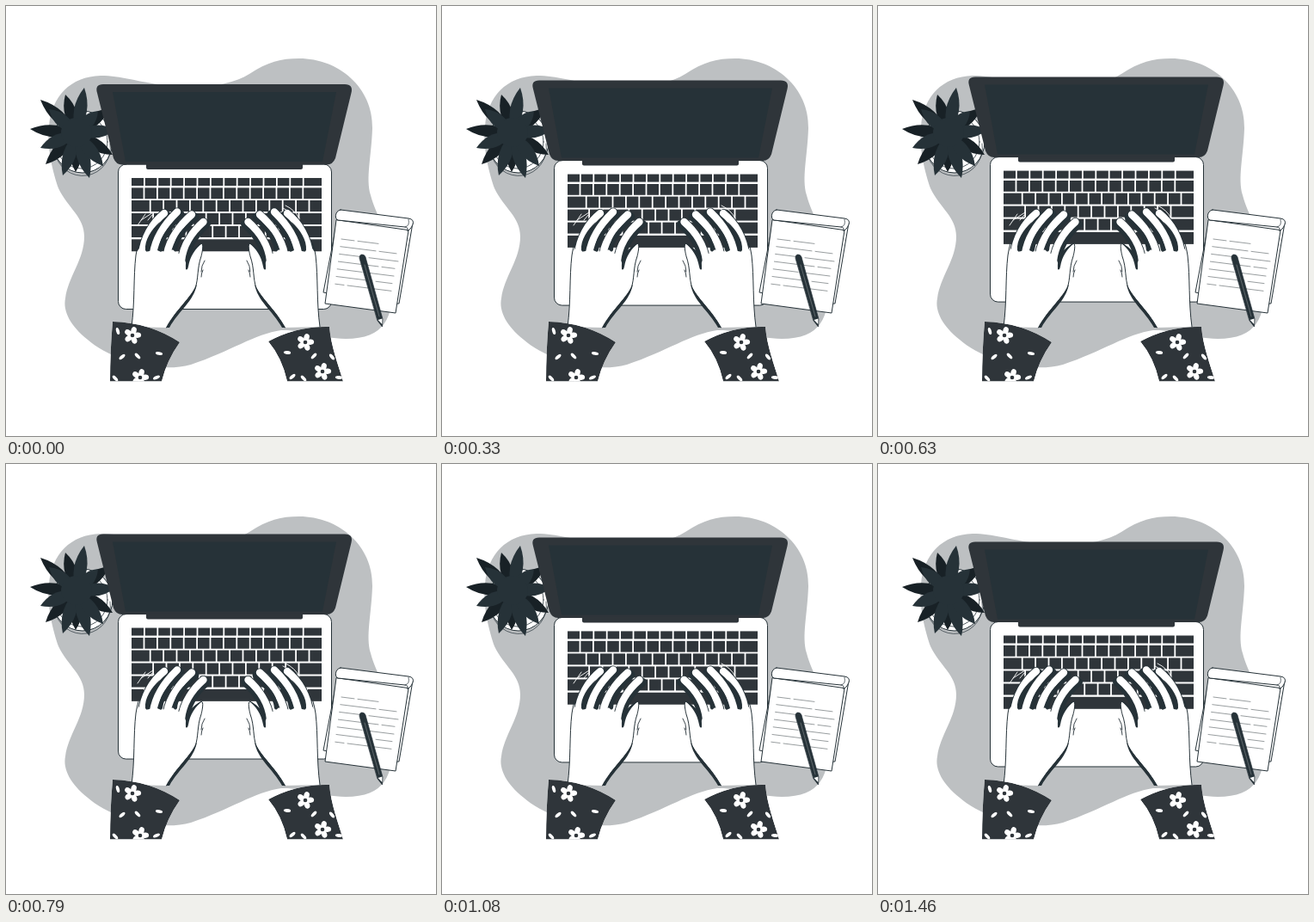
An HTML page with a canvas that plays this animation: 500x500 px, repeating every 1.5 s.

```html
<!DOCTYPE html>
<html lang="en">
<head>
<meta charset="utf-8">
<title>Typing</title>
<style>
html, body { margin: 0; width: 100%; height: 100%; overflow: hidden; background: #fff; }
canvas { display: block; width: 500px; height: 500px; }
</style>
</head>
<body>
<canvas id="stage"></canvas>
<script>
const LOOP = 1500, LIFT = 10;
const INK = '#263238', SOFT = '#2f353a', DEEP = '#182126', GREY = '#bdc0c2', WHITE = '#fff';

const canvas = document.getElementById('stage');
const ctx = canvas.getContext('2d');
const ratio = window.devicePixelRatio || 1;
canvas.width = canvas.height = 500 * ratio;

function fill(d, color) {
  ctx.fillStyle = color;
  ctx.fill(new Path2D(d));
}

function line(d, color = INK, width = 1) {
  ctx.strokeStyle = color;
  ctx.lineWidth = width;
  ctx.stroke(new Path2D(d));
}

function shape(d, color = WHITE, width = 1) {
  fill(d, color);
  line(d, INK, width);
}

function oval(x, y, rx, ry, angle, color) {
  ctx.fillStyle = color;
  ctx.beginPath();
  ctx.ellipse(x, y, rx, ry, angle, 0, 7);
  ctx.fill();
}

function drawBlob() {
  fill(`M110 81C135 81 150 88 185 92C225 98 262 92 283 79C304 65 320 61 341 61
    C387 61 427 95 426 142C425 175 418 200 424 220C430 245 448 262 448 320
    C452 362 440 387 395 387C362 386 345 376 320 377C290 381 260 402 215 417
    C175 428 120 410 95 388C75 372 66 355 69 340C72 315 91 295 91 268
    C91 245 72 235 61 212C55 195 47 165 50 140C53 105 75 82 110 81Z`, GREY);
}

// A pointed leaf from the plant's heart to its tip.
function leaf(tipX, tipY, width, color) {
  const x = 82, y = 148, dx = tipX - x, dy = tipY - y, len = Math.hypot(dx, dy);
  const nx = -dy / len * width, ny = dx / len * width;
  const mx = x + dx * 0.5, my = y + dy * 0.5;
  fill(`M${x} ${y}Q${mx + nx} ${my + ny} ${tipX} ${tipY}Q${mx - nx} ${my - ny} ${x} ${y}Z`, color);
}

function drawPlant() {
  shape('M124 158A35 36 0 1 1 54 158A35 36 0 1 1 124 158Z');
  line('M118 158A30 31 0 1 1 58 158A30 31 0 1 1 118 158Z', INK, 0.8);
  line('M121 160A32 32 0 0 1 57 170', INK, 0.7);
  for (const [x, y] of [[40, 109], [69, 103], [28, 143], [46, 184], [120, 119], [124, 173], [81, 193]]) leaf(x, y, 14, DEEP);
  for (const [x, y] of [[91, 95], [50, 120], [40, 165], [66, 197], [97, 200], [113, 186], [127, 144], [107, 122]]) leaf(x, y, 15, INK);
  oval(82, 147, 18, 17, 0, INK);
}

function keyRow(y, height, first, count) {
  const pitch = 15.4, left = 146, right = 367, gap = 1.8;
  let x = left;
  for (let i = 0; i < count; i++) {
    const end = i === count - 1 ? right + gap : i ? x + pitch : x + first;
    ctx.fillRect(x, y, end - gap - x, height);
    x = end;
  }
}

function drawLaptop() {
  ctx.beginPath();
  ctx.roundRect(130.5, 184, 248, 168.5, 9);
  ctx.fillStyle = WHITE;
  ctx.fill();
  ctx.strokeStyle = INK;
  ctx.lineWidth = 1;
  ctx.stroke();
  fill(`M113 91H394Q404 91 401.500 101L383 177Q380 184.500 373 184.500H135
    Q128 184.500 125 177L106 101Q103 91 113 91Z`, SOFT);
  fill('M124 100H384L368 181H139Z', INK);
  fill('M163 183H345V188Q345 190 343 190H165Q163 190 163 188Z', SOFT);

  ctx.fillStyle = SOFT;
  keyRow(200, 9, 15.8, 14);
  keyRow(211.4, 12.8, 15.4, 14);
  keyRow(226, 13, 22.6, 14);
  keyRow(241, 13, 26, 13);
  keyRow(256, 13, 33.5, 12);
  for (const [x, w] of [[146, 14], [162, 14], [178, 17], [197, 101], [300, 17], [319, 14], [335, 14], [351, 16]]) {
    ctx.fillRect(x, 271.3, w, 14);
  }
}

function drawHand() {
  const fingers = [
    'M158 289C160 270 170 252 184 241',
    'M171 288C174 268 186 252 199 239.500',
    'M187 289C190 270 204 253 216 242.500',
    'M204 296C206 277 218 261 229.500 251'
  ];
  // Dark undersides sit to the right of each finger.
  ctx.save();
  ctx.translate(4, 2.5);
  for (const d of fingers) line(d, INK, 9);
  ctx.restore();
  for (const d of fingers) {
    line(d, INK, 10.2);
    line(d, WHITE, 8.4);
  }
  const palm = `M146 373C150 345 148 315 151 290C154 279 158 280 162 285
    C166 287 171 281 176 284C184 289 190 280 197 285C203 290 208 291 210 302
    C212 290 218 282 226 277C230 274 229 283 227 291C222 305 224 317 220 328
    C213 342 199 352 187 374Z`;
  fill(palm, WHITE);
  line('M146 373C150 345 148 315 151 290Q152 283 154 276');
  line('M210 304C212 290 218 282 226 277C230 274 229 283 227 291C222 305 224 317 220 328C213 342 199 352 187 374');
  fill('M209 306C208 292 215 281 229 275C220 282 214 291 212 303Q211 308 209 306Z', INK);
  fill('M222 323C214 341 198 352 186 374L190 374C201 354 219 343 222 323Z', INK);
  for (const d of [
    'M162 284C161 272 169 260 179 251C171 264 168 272 166 283Q164 287 162 284Z',
    'M178 284C178 271 185 261 195 251C186 264 184 273 182 284Q180 287 178 284Z',
    'M195 284C195 271 202 262 212 253C204 265 200 274 199 284Q197 287 195 284Z'
  ]) fill(d, INK);
  line('M231 296Q227 302 227 309M229 307Q227 311 227 315', INK, 0.9);
}

function drawHands() {
  drawHand();
  ctx.save();
  ctx.translate(511, 0);
  ctx.scale(-1, 1);
  drawHand();
  ctx.restore();
  line('M153 255L162 242M157 249L171 240M165 249L170 243', WHITE, 0.9);
  line('M325 232Q336 237 341 247M329 239L338 250M322 235L331 240', WHITE, 0.9);
}

function flower(x, y, turn) {
  for (let i = 0; i < 5; i++) {
    const a = turn + i * Math.PI * 0.4;
    oval(x + Math.cos(a) * 5.7, y + Math.sin(a) * 5.7, 4.4, 3.2, a, WHITE);
  }
  oval(x, y, 2.3, 2.3, 0, SOFT);
}

function drawCuff(d, flowers, petals) {
  ctx.save();
  ctx.clip(new Path2D(d));
  fill(d, SOFT);
  for (const [x, y] of flowers) flower(x, y, -1.3);
  for (const [x, y, a] of petals) oval(x, y, 4.2, 1.9, a, WHITE);
  ctx.restore();
}

function drawCuffs() {
  drawCuff('M124 367Q167 368 202 391Q187 412 181 436.500H121Q121 401 124 367Z',
    [[147, 383], [156, 432]],
    [[135, 408, -0.7], [153, 407, 0.8], [178, 404, 0.2], [127, 433, 0.8], [175, 432, -0.4], [130, 378, 1.3]]);
  drawCuff('M305 390Q338 372 376 373C378 396 386 416 392 436.500H327Q321 409 305 390Z',
    [[348, 391], [368, 425]],
    [[327, 403, 0.1], [358, 407, -0.8], [333, 431, -0.7], [346, 433, 0.8], [379, 408, 0.9], [387, 432, 0.1]]);
}

function drawNotepad() {
  shape('M385 250L369 333L447 346L457 346L473 252Z');
  shape('M384 249L371 346L453 357L468 261Z');
  shape('M389 237L468 247Q475 248 473 254Q472 258 467 262Q468 257 464 257L386 249Q382 247 384 241Q386 237 389 237Z');
  line('M464 257Q470 256 468 248', INK, 0.7);
  const ends = [[405, 433], [430, 454], [418, 456], [433, 452], [414, 451], [426, 449], [393, 448]];
  ends.forEach(([stop, last], i) => {
    const x = 390 - i * 1.2, y = 271 + i * 8.7;
    const at = px => `${px} ${y + (px - x) * 0.125}`;
    line(`M${at(x)}L${at(stop)}M${at(stop + 4)}L${at(last)}`, '#8d9295', 0.9);
  });
  shape('M411 293Q411 289 414 289Q417 289 418 292L438 364L437.500 373L432 366Z', INK, 0.7);
  fill('M432.500 365L437.500 363.500L437.300 370Z', WHITE);
  line('M417 301L434 361', '#858b8f', 0.6);
}

function draw(now) {
  const phase = now % LOOP / LOOP;
  const lift = LIFT * (1 - Math.abs(1 - 2 * phase));
  ctx.setTransform(ratio, 0, 0, ratio, 0, 0);
  ctx.fillStyle = WHITE;
  ctx.fillRect(0, 0, 500, 500);
  ctx.lineCap = ctx.lineJoin = 'round';
  drawBlob();
  drawPlant();
  ctx.save();
  ctx.translate(0, -lift);
  drawLaptop();
  ctx.restore();
  drawNotepad();
  drawHands();
  drawCuffs();
}

const start = performance.now();
function tick() {
  draw(performance.now() - start);
  requestAnimationFrame(tick);
}
tick();
</script>
</body>
</html>
```
